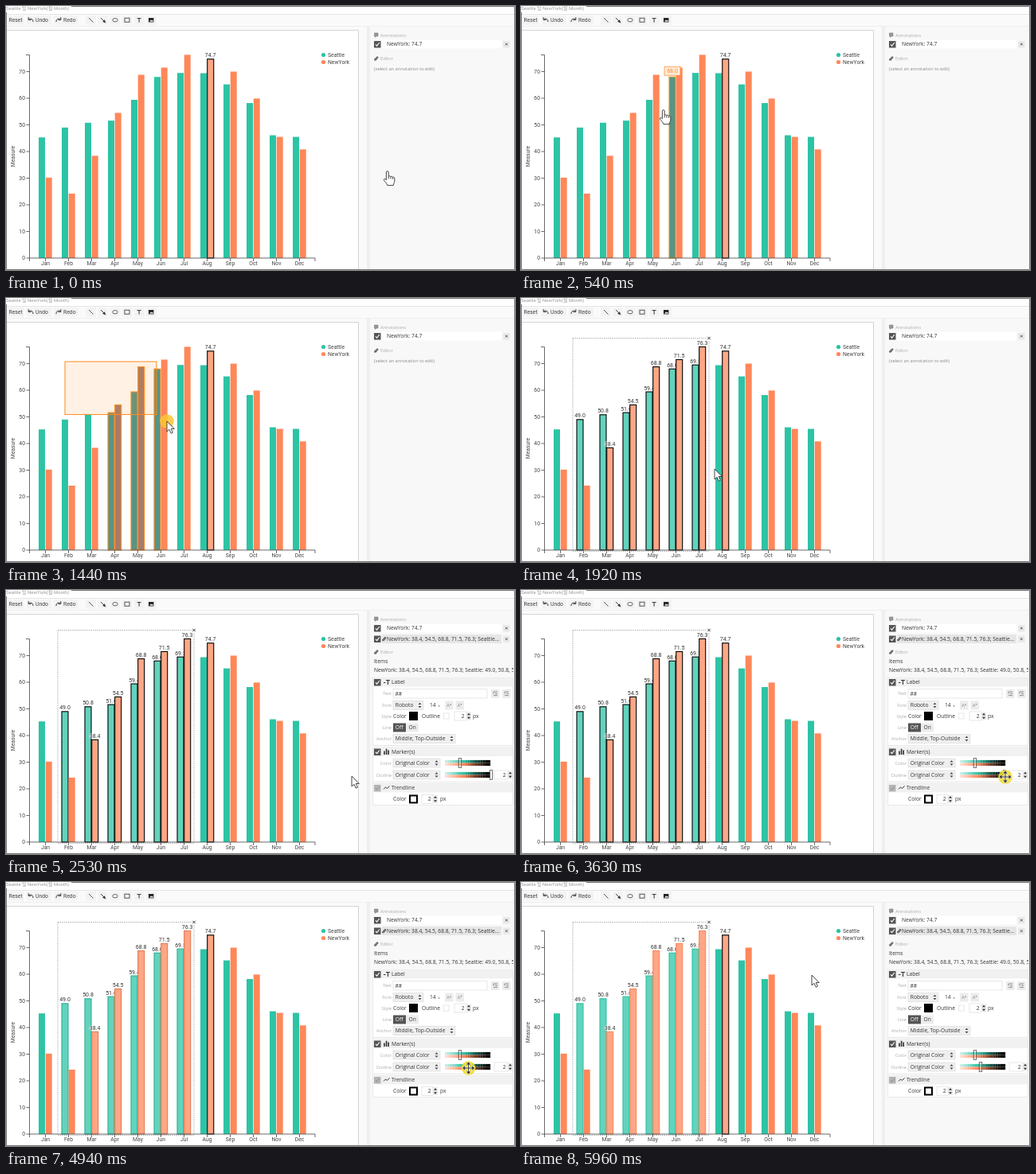
An HTML page for the animation above (6220 ms loop, 639 by 332 pixels).

```html
<!DOCTYPE html>
<html lang="en">
<head>
<meta charset="utf-8">
<title>Chart annotations</title>
<style>
html, body { margin: 0; width: 100%; height: 100%; overflow: hidden; background: #f9f9f9; }
svg { display: block; }
text { font-family: Roboto, "Noto Sans CJK KR", "Noto Sans CJK", sans-serif; font-size: 6.8px; fill: #444; }
.ui text { font-family: "Open Sans", "Noto Sans", sans-serif; font-size: 6.7px; fill: #333; }
.ui .dim { font-size: 5.7px; fill: #888; }
.ui .cap { font-size: 5.7px; fill: #aaa; }
.ui .head { font-size: 6.7px; fill: #333; }
.lab { font-size: 7px; fill: #333; text-anchor: middle; paint-order: stroke; stroke: #fff; stroke-opacity: .75; stroke-width: 1.4px; }
.hot { fill: #ff8a1e; font-size: 7px; text-anchor: middle; }
</style>
</head>
<body>
<svg id="stage" width="639" height="332" viewBox="0 0 639 332"></svg>
<script>
const NS = 'http://www.w3.org/2000/svg';
const stage = document.getElementById('stage');
const LOOP = 6220;
const TEAL = [45, 196, 165], CORAL = [255, 135, 90];
const ORANGE = '#ff8a1e';

function el(tag, attrs, parent = stage) {
  const n = document.createElementNS(NS, tag);
  set(n, attrs);
  return parent.appendChild(n);
}
function set(n, attrs) { for (const k in attrs) n.setAttribute(k, attrs[k]); }
const box = (p, x, y, width, height, fill, stroke = 'none', more) =>
  el('rect', { x, y, width, height, fill, stroke, 'stroke-width': .7, ...more }, p);
const line = (p, d, stroke = '#444', w = .8, fill = 'none') =>
  el('path', { d, stroke, 'stroke-width': w, fill }, p);
function label(p, x, y, str, cls = '', anchor) {
  const n = el('text', { x, y, class: cls }, p);
  if (anchor) n.setAttribute('text-anchor', anchor);
  n.textContent = str;
  return n;
}
const show = (n, on) => { n.style.display = on ? '' : 'none'; };
const mix = (a, b, k) => a.map((v, i) => v + (b[i] - v) * k);
const css = c => `rgb(${c.map(Math.round)})`;

// Slider position 0..1: white, then the pure colour, then black.
function shade(c, u) {
  return css(u < .45 ? mix([255, 255, 255], c, u / .45) : mix(c, [0, 0, 0], Math.min(1, (u - .45) / .48)));
}
const SLIDE_X = 551, SLIDE_W = 57;
const slideAt = x => (x - SLIDE_X) / SLIDE_W;
const FILL_X = 570;

// ---- page ----
box(stage, 0, 0, 639, 332, '#fafafa');
box(stage, 0, 0, 639, 10, '#fff');
line(stage, 'M0 10.5H639', '#e4e4e4', 1);
line(stage, 'M0 25.5H639', '#efefef', 1);
label(stage, 0, 5, 'Seattle 및 NewYork(월 Month)').style.cssText = 'font-size:6px;fill:#999';

// ---- toolbar ----
[[2, 20], [26, 31], [60, 31]].forEach(b => box(stage, b[0], 12, b[1], 11.5, '#f3f3f3'));
label(stage, 3.5, 20, 'Reset');
label(stage, 37, 20, 'Undo');
label(stage, 72, 20, 'Redo');
line(stage, 'M34 20C34 16 31 15.5 28.6 16.6M28.2 14.2V17.4H31.6', '#333', 1);
line(stage, 'M63 20C63 16 66 15.5 68.4 16.6M68.8 14.2V17.4H65.4', '#333', 1);
for (let i = 0; i < 6; i++) box(stage, 100 + i * 15.2, 12, 13, 11.5, '#f3f3f3');
line(stage, 'M104 15L109.5 20.5', '#333', .8);
line(stage, 'M119 15L124 20', '#333', .9);
line(stage, 'M125 21L121.6 19.6L123.6 17.6Z', '#333', .6, '#333');
el('ellipse', { cx: 137, cy: 17.7, rx: 3.2, ry: 2.2, fill: 'none', stroke: '#444', 'stroke-width': .8 });
box(stage, 149, 15.2, 6, 5, 'none', '#444', { 'stroke-width': .9 });
line(stage, 'M164.6 15.6H169.6M167.1 15.6V20.6', '#333', 1);
box(stage, 179, 15, 6.4, 5.4, '#222');
line(stage, 'M180 19.6L182 17.4L183 18.4L184 17.6L185 19.6Z', 'none', 0, '#fff');

// ---- chart ----
box(stage, 0, 30, 443, 302, '#fff');
line(stage, 'M0 30.5H442.5V332', '#d4d4d4', 1);
const BASE = 317, UNIT = 3.35;
const yOf = v => BASE - v * UNIT;
const months = 'Jan Feb Mar Apr May Jun Jul Aug Sep Oct Nov Dec'.split(' ');
const series = [
  { name: 'Seattle', color: TEAL, dx: 0, data: [45.3, 49, 50.8, 51.6, 59.4, 68, 69.5, 69.4, 65.2, 58.2, 46.1, 45.5] },
  { name: 'NewYork', color: CORAL, dx: 8.7, data: [30.2, 24.2, 38.4, 54.5, 68.8, 71.5, 76.3, 74.7, 70, 59.9, 45.5, 40.8] }
];
const BAR_W = 8;
const bars = [];
series.forEach((s, si) => {
  const g = el('g', {}), over = el('g', {});
  s.data.forEach((v, i) => {
    const x = 41 + i * 29 + s.dx, y = yOf(v);
    bars.push({
      x, y, v, color: s.color, pinned: si === 1 && i === 7,
      picked: i > 0 && i < 7 && v > 30,
      rect: box(g, x, y, BAR_W, BASE - y, css(s.color)),
      text: label(over, x + BAR_W / 2, y - 2.5, v.toFixed(1), 'lab')
    });
  });
  const ly = 61.5 + si * 9;
  el('circle', { cx: 398.5, cy: ly, r: 2.6, fill: css(s.color) });
  label(stage, 404, ly + 2.4, s.name);
});
line(stage, 'M25 61.5H29.5V317', '#444', .8);
line(stage, 'M29.5 321V317H388V321', '#444', .8);
for (let v = 0; v <= 70; v += 10) {
  line(stage, `M25.5 ${yOf(v)}H29.5`);
  label(stage, 24, yOf(v) + 2.4, v, '', 'end');
}
months.forEach((m, i) => {
  line(stage, `M${49.5 + i * 29} 317V321`);
  label(stage, 49.5 + i * 29, 326, m, '', 'middle');
});
const axis = label(stage, 0, 0, 'Measure', '', 'middle');
set(axis, { transform: 'translate(11.2 189) rotate(-90)' });

const frame = el('g', {});
box(frame, 65, 50.5, 171, 268, 'none', '#888', { 'stroke-dasharray': '1.4 1.2' });
box(frame, 232.5, 47, 7, 7, '#fff');
line(frame, 'M234.3 48.8L237.7 52.2M237.7 48.8L234.3 52.2', '#222', .9);

const tip = el('g', {});
box(tip, -10, -13, 20, 11, '#ffead9', ORANGE);
const tipText = label(tip, 0, -5, '', 'hot');
const lasso = box(stage, 74, 80, 1, 1, 'rgba(255,138,30,.12)', ORANGE, { 'stroke-width': 1 });

// ---- side panel ----
const ui = el('g', { class: 'ui' });
box(ui, 453, 26, 4, 306, '#efefef');
box(ui, 457, 26, 182, 306, '#f8f8f8');

function check(p, y, on = true) {
  box(p, 462, y - 4, 8.5, 8.5, on ? '#555' : '#b4b4b4');
  line(p, `M464 ${y + .3}L465.7 ${y + 2.2}L468.8 ${y - 2}`, on ? '#fff' : '#999', 1.1);
}
function pencil(p, x, y) { line(p, `M${x} ${y + 2.2}H${x + 2}L${x + 4.8} ${y - 1.4}L${x + 3.4} ${y - 2.4}L${x} ${y + 1}Z`, '#444', .6, '#777'); }
function item(p, y, str, active) {
  check(p, y);
  box(p, 472, y - 5.5, 150, 11, active ? '#e6e6e6' : '#fff');
  if (active) pencil(p, 472.5, y);
  label(p, 478, y + 2.4, str);
  box(p, 624, y - 4, 8.5, 8.5, '#e9e9e9');
  line(p, `M627 ${y - 1.2}l2.6 2.6M629.6 ${y - 1.2}l-2.6 2.6`, '#444', .9);
}
function editor(p, y) {
  pencil(p, 462.5, y - 2);
  label(p, 470, y, 'Editor', 'cap');
}
line(ui, 'M462.5 34H467V38H464.5L463.5 39.4V38H462.5Z', '#777', .6, '#999');
label(ui, 470, 38.6, 'Annotations', 'cap');
item(ui, 48, 'NewYork: 74.7');

const idle = el('g', {}, ui);
editor(idle, 68);
label(idle, 462, 81.4, '(select an annotation to edit)', 'dim');

const edit = el('g', {}, ui);
const section = (y, h) => {
  box(edit, 460.5, y, 176, h, '#fff', '#e2e2e2');
  box(edit, 461, y, 175, 11, '#f1f1f1');
};
const caption = (y, str) => label(edit, 484, y + 2, str, 'cap', 'end');
const button = (x, y, w, fill = '#ececec') => box(edit, x, y - 5.5, w, 11, fill);
function arrows(x, y) {
  box(edit, x, y - 5, 6, 10, '#e9e9e9');
  line(edit, `M${x + 1} ${y - 1.2}h4l-2 -2.6zM${x + 1} ${y + 1.2}h4l-2 2.6z`, 'none', 0, '#333');
}
function select(y, w, str) {
  box(edit, 486, y - 5.5, w, 11, '#efefef', '#ddd');
  label(edit, 488.8, y + 2.4, str);
  line(edit, `M${w + 479.5} ${y - .9}h4l-2 -2.4zM${w + 479.5} ${y + .9}h4l-2 2.4z`, 'none', 0, '#444');
}
function number(x, y, w, str) {
  box(edit, x, y - 5.5, w, 11, '#fff', '#ddd');
  label(edit, x + w - 2.5, y + 2.4, str, '', 'end');
  arrows(x + w, y);
}
function slider(y) {
  const n = 18, w = SLIDE_W / n;
  [TEAL, CORAL].forEach((c, r) => {
    for (let i = 0; i < n; i++)
      box(edit, SLIDE_X + i * w, y - 3.6 + r * 3.6, w + .1, 3.6, shade(c, .12 + i / n * .9));
  });
  return box(edit, -1.7, y - 5.8, 3.4, 11.6, 'rgba(255,255,255,.35)', '#555', { 'stroke-width': .9 });
}
const items = 'NewYork: 38.4, 54.5, 68.8, 71.5, 76.3; Seattle';
item(edit, 61.5, items + '...', true);
editor(edit, 80);
label(edit, 462, 92, 'Items');
label(edit, 462, 103, items + ': 49.0, 50.8, 5');
box(edit, 637, 95, 2, 12, '#f8f8f8');

section(110.5, 85);
check(edit, 116);
line(edit, 'M477 113.5H482M479.5 113.5V119M474 116.5H476.4', '#333', 1.1);
label(edit, 484, 118.4, 'Label');
caption(130, 'Text');
box(edit, 486, 124.5, 118, 11.5, '#fff', '#ddd');
label(edit, 488.5, 132.6, '##');
[609, 623].forEach(x => {
  button(x, 130.5, 10.5);
  line(edit, `M${x + 3} 128H${x + 8}M${x + 5} 130.3H${x + 8}M${x + 3} 132.6H${x + 8}M${x + 3} 128V130.5`, '#777', .8);
});
caption(145, 'Font');
select(145, 38, 'Roboto');
box(edit, 529, 139.5, 13, 11, '#fff');
label(edit, 532, 147.4, '14');
label(edit, 542, 147.2, '±', 'dim');
[[551, 'A', '▴'], [564.5, 'A', '▾']].forEach(([x, a, m]) => {
  button(x, 145, 10.5);
  label(edit, x + 2.2, 147.4, a, 'dim');
  label(edit, x + 6, 144.8, m, 'dim').style.fontSize = '4px';
});
caption(159, 'Style');
label(edit, 486, 161, 'Color');
box(edit, 506, 153, 11, 11, '#000');
label(edit, 522, 161, 'Outline');
box(edit, 549.5, 155, 6.5, 7, '#fff', '#ddd');
number(563, 158.5, 15, '2');
label(edit, 586, 161, 'px');
caption(173, 'Line');
button(486, 173, 16, '#555');
label(edit, 488.7, 175.4, 'Off').style.fill = '#fff';
button(502, 173, 16);
label(edit, 505.5, 175.4, 'On');
caption(187, 'Anchor');
select(187, 78, 'Middle, Top-Outside');

section(198, 43);
check(edit, 203.5);
line(edit, 'M475 207V202.5M477.6 207V199.8M480.2 207V201.5', '#333', 1.6);
label(edit, 484, 206, 'Marker(s)');
caption(217.5, 'Color');
select(217.5, 59, 'Original Color');
set(slider(217.5), { transform: `translate(${FILL_X} 0)` });
caption(232.5, 'Outline');
select(232.5, 59, 'Original Color');
const thumb = slider(232.5);
number(613, 232.5, 17, '2');

section(243.5, 27);
check(edit, 249, false);
line(edit, 'M474 250.5L476.5 248L478.5 249.5L481.5 246.5', '#333', 1);
label(edit, 484, 251.4, 'Trendline');
label(edit, 486, 265.2, 'Color');
box(edit, 507, 258.5, 9, 9, '#fff', '#000', { 'stroke-width': 2 });
number(522, 263, 14, '2');
label(edit, 545, 265.2, 'px');

line(stage, 'M82 .5H638.5V331.5H.5V8', '#777', 1);

// ---- pointer ----
const pointer = el('g', {});
const glow = el('circle', { r: 8.8 }, pointer);
const arrow = line(pointer, 'M0 0V13L3 10.3L5.2 15.2L7.4 14.2L5.3 9.5H9.3Z', '#333', .9, '#fff');
const hand = line(pointer,
  'M-1.6 1C-1.6 -.8 1.2 -.8 1.2 1V6.4C2 5.4 3.8 5.6 4 6.8C4.8 6 6.4 6.3 6.6 7.4C7.6 6.8 8.8 7.4 8.8 8.6V12C8.8 14 7.4 15.2 7.2 17.6H-.2C-.6 15.2 -3.2 13.4 -4.6 10.8C-5 9.4 -3.4 8.6 -1.6 10.8ZM1.2 6.4V9.4M4 6.8V9.6M6.6 7.4V9.8',
  '#333', .9, '#fff');
const move = el('g', {}, pointer);
const cross = 'M-6 0H6M0 -6V6';
const heads = 'M0 -7.4L-2.4 -4.6H2.4ZM0 7.4L-2.4 4.6H2.4ZM-7.4 0L-4.6 -2.4V2.4ZM7.4 0L4.6 -2.4V2.4Z';
line(move, cross, '#fff', 2.6);
line(move, heads, '#fff', 1.2, '#fff');
line(move, cross, '#333', 1);
line(move, heads, '#333', .3, '#333');

// ---- timing ----
// Bursts of movement: start, number of steps, step length.
const bursts = [[400, 9, 70], [1160, 9, 70], [1920, 2, 70], [2250, 9, 70], [2880, 8, 70],
  [3630, 9, 70], [4260, 4, 70], [4800, 4, 90], [5400, 9, 70]];
function stepTime(t) {
  let q = 0;
  for (const [start, n, dt] of bursts)
    if (t >= start) q = start + Math.min(n - 1, Math.floor((t - start) / dt)) * dt;
  return q;
}
// Pointer path: time, x, y.
const path = [
  [0, 479, 208], [330, 479, 208], [400, 370, 186], [470, 212, 145], [540, 179, 131], [610, 124, 98],
  [680, 94, 81], [820, 79, 73], [960, 76, 72], [1160, 76, 71], [1230, 92, 84], [1440, 202, 155],
  [1580, 234, 195], [1720, 243, 215], [2180, 243, 215], [2250, 262, 217], [2530, 434, 234],
  [2670, 520, 234], [2810, 575, 233], [2880, 577, 233], [3370, 608, 235], [3630, 608, 235],
  [3910, 594, 235], [4190, 585, 234], [4470, 583, 234], [4730, 583, 234], [5070, 578, 234],
  [5330, 578, 234], [5400, 574, 231], [5680, 448, 158], [5960, 365, 117], [LOOP, 365, 117]
];
function at(t) {
  const i = Math.max(1, path.findIndex(p => p[0] >= t));
  const a = path[i - 1], b = path[i];
  const k = Math.max(0, (t - a[0]) / (b[0] - a[0]));
  return [a[1] + (b[1] - a[1]) * k, a[2] + (b[2] - a[2]) * k];
}
const LAG = 25;

function draw(t) {
  const q = stepTime(t);
  const [x, y] = at(q), [lx, ly] = at(Math.max(0, q - LAG));
  const dragging = q >= 1230 && q < 1920;
  const picked = q >= 1920, panel = q >= 1990;
  const sliding = q >= 3370 && q < 5400;
  const hovering = (q >= 400 && q < 1160) || (q >= 2250 && q < 2810);
  const thumbX = q < 3630 ? 609 : q < 5330 ? Math.min(609, x - 1) : 577;
  let hot = null;

  for (const b of bars) {
    const noted = b.pinned || (picked && b.picked);
    const over = hovering && lx >= b.x && lx <= b.x + BAR_W && ly > b.y && ly < BASE;
    const caught = dragging && b.x < lx && b.x + BAR_W > 74 && b.y < ly - 2;
    if (over) hot = b;
    let fill = css(b.color), stroke = 'none';
    if (noted) {
      fill = shade(b.color, slideAt(FILL_X));
      stroke = b.pinned ? '#222' : shade(b.color, slideAt(thumbX));
    }
    if (over || caught) {
      fill = css(mix(b.color, [112, 118, 115], .62));
      stroke = over ? '#d8962c' : ORANGE;
    }
    set(b.rect, { fill, stroke, 'stroke-width': b.pinned ? 1.3 : 1.1 });
    show(b.text, noted && !over);
  }

  show(tip, hot);
  if (hot) {
    set(tip, { transform: `translate(${hot.x + BAR_W / 2} ${hot.y})` });
    tipText.textContent = hot.v.toFixed(1);
  }
  show(lasso, dragging);
  set(lasso, { width: Math.max(0, lx - 74), height: Math.max(0, ly - 80) });
  show(frame, picked);
  show(edit, panel);
  show(idle, !panel);
  set(thumb, { transform: `translate(${thumbX} 0)` });

  set(pointer, { transform: `translate(${x} ${y})` });
  const pressed = q >= 1160 && q < 1920;
  show(glow, pressed || sliding);
  set(glow, { fill: sliding ? 'rgba(240,222,40,.88)' : 'rgba(252,198,50,.85)' });
  show(hand, q < 1160);
  show(move, sliding);
  show(arrow, q >= 1160 && !sliding);
}

const begin = performance.now();
function tick() {
  draw((performance.now() - begin) % LOOP);
  requestAnimationFrame(tick);
}
tick();
</script>
</body>
</html>
```
